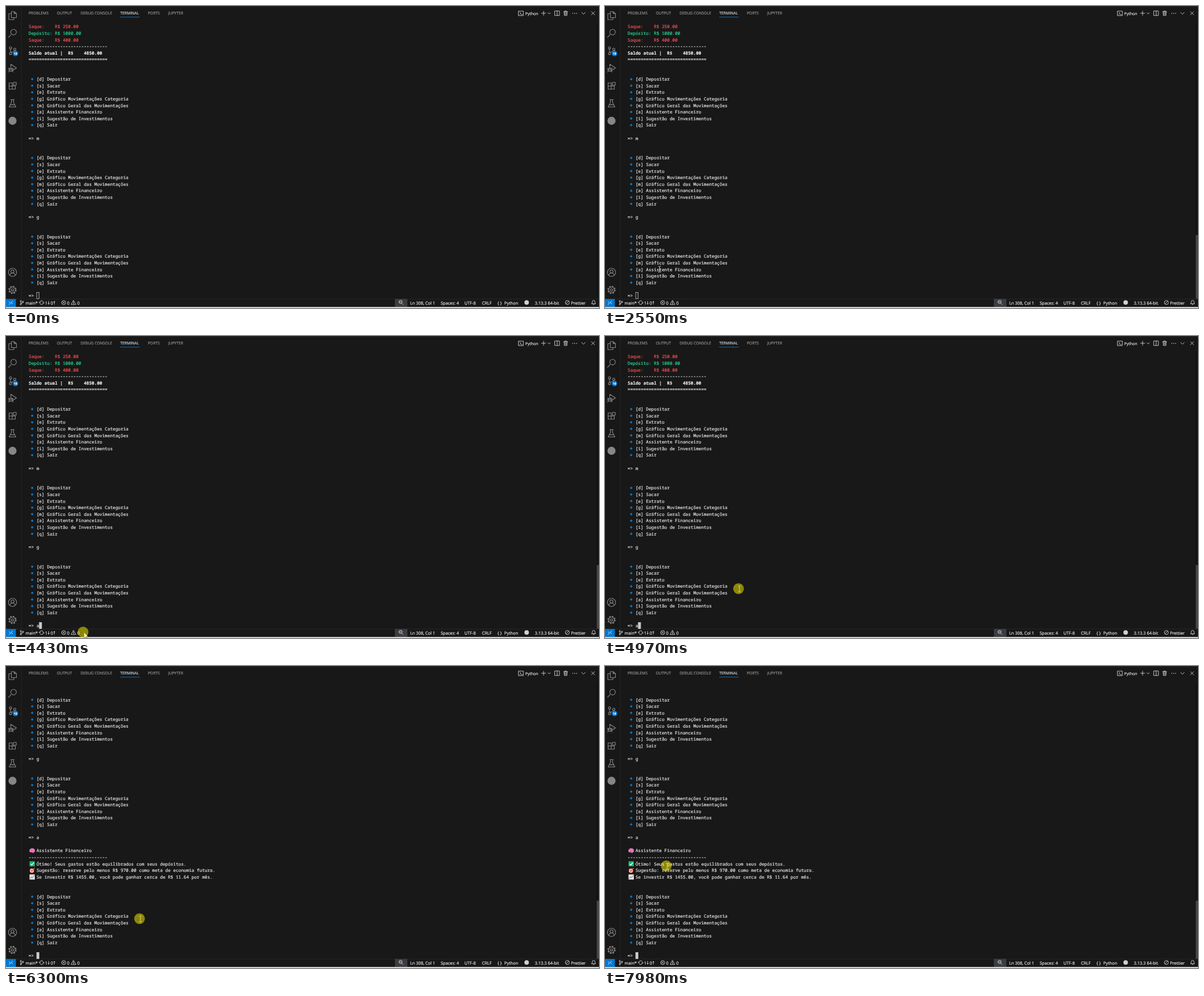
Recreate the animation shown at these times as an HTML page. Size 1049 by 534 pixels, loop 8 s.

```html
<!DOCTYPE html>
<html lang="pt-BR">
<head>
<meta charset="utf-8">
<title>Terminal</title>
<style>
html, body { margin: 0; width: 100%; height: 100%; overflow: hidden; background: #181818; }
svg { display: block; width: 1049px; height: 534px; text-rendering: geometricPrecision; }
text { white-space: pre; fill: currentColor; stroke: currentColor; stroke-width: .2; }
.mono { font: 7.75px "Noto Sans Mono", "DejaVu Sans Mono", monospace; }
.ui { font: 7.45px "Open Sans", "Noto Sans", sans-serif; color: #e4e4e4; }
.tab { font-size: 6.8px; color: #a2a2a2; stroke-width: .1; }
.icon { fill: none; stroke: #8a8a8a; stroke-width: 1.1; stroke-linejoin: round; stroke-linecap: round; }
.small { stroke: #dedede; stroke-width: .85; }
</style>
</head>
<body>
<svg id="stage" viewBox="0 0 1049 534" xmlns="http://www.w3.org/2000/svg"></svg>
<script>
const NS = 'http://www.w3.org/2000/svg';
const LOOP = 8000, COL = 4.65, PITCH = 11.605, LEFT = 40, TOP = 36.5;
const stage = document.getElementById('stage');

function add(parent, tag, attrs = {}, text) {
  const el = document.createElementNS(NS, tag);
  for (const k in attrs) el.setAttribute(k, attrs[k]);
  if (text !== undefined) el.textContent = text;
  parent.appendChild(el);
  return el;
}
const rect = (p, x, y, width, height, fill) => add(p, 'rect', { x, y, width, height, fill });
const path = (p, d, attrs) => add(p, 'path', { d, ...attrs });
const dot = (p, cx, cy, r, fill) => add(p, 'circle', { cx, cy, r, fill });
const label = (x, y, text, cls = 'ui') => add(stage, 'text', { x, y, class: cls }, text);
function icon(x, y, d, small) {
  return path(stage, d, { class: small ? 'icon small' : 'icon', transform: `translate(${x} ${y})` });
}
const ring = r => `M${-r} 0a${r} ${r} 0 1 0 ${2 * r} 0a${r} ${r} 0 1 0 ${-2 * r} 0`;
const show = (el, on) => el.setAttribute('display', on ? 'inline' : 'none');

// ---- window frame
rect(stage, 0, 0, 1049, 534, '#181818');
rect(stage, 0, .6, 1049, .8, '#2f2f2f');
rect(stage, 26.6, 1, .8, 517, '#2b2b2b');
rect(stage, 1045, 29, .8, 489, '#07090c');

// ---- activity bar
icon(11.5, 17, 'M-2 -7H3L7 -3.5V3.5H-2ZM3 -7V-3.5H7M-2 -3.5H-6.5V7H2.5V3.5');
icon(11.5, 48, 'M-2.8 2.8L-7 7.3M-3 -1.8a4.9 4.9 0 1 0 9.8 0a4.9 4.9 0 1 0 -9.8 0');
icon(11.5, 79, 'M-5.5 -5a2 2 0 1 0 4 0a2 2 0 1 0 -4 0M-5.5 5a2 2 0 1 0 4 0a2 2 0 1 0 -4 0M2 -2.5a2 2 0 1 0 4 0a2 2 0 1 0 -4 0M-3.5 -3V3M4 -.5Q4 2 -3 2.6');
icon(11.5, 110, 'M-3 -2V-7L7 -.5L.5 4M-5.5 2.5a2.6 2.9 0 1 0 5.2 0a2.6 2.9 0 1 0 -5.2 0M-7.3 0L-5 1.3M1.4 0L-1 1.3M-7.6 3H-5.5M-.3 3H1.7M-7 6.6L-5 4.6M1.2 6.6L-.9 4.6M-5.4 2H-.4');
icon(11.5, 141, 'M-6 -5H-.5V6H-6ZM-6 .5H5V6H-.5M5 .5V6M1.6 -6H6.6V-1H1.6Z');
icon(11.5, 172, 'M-3 -6.5H3M-1.8 -6.5V-1.5L-6 6.5H6L1.8 -1.5V-6.5M-4 2.6H4');
dot(stage, 11.5, 203, 7.2, '#868686');
icon(11.5, 471, ring(7.3) + 'M-2.7 -1.6a2.7 2.7 0 1 0 5.4 0a2.7 2.7 0 1 0 -5.4 0M-4.8 5.2Q-4 1.3 0 1.3Q4 1.3 4.8 5.2');
icon(11.5, 502, ring(2) + ring(5));
add(stage, 'circle', { cx: 11.5, cy: 502, r: 6.3, fill: 'none', stroke: '#868686', 'stroke-width': 2, 'stroke-dasharray': '2.5 2.448' });
dot(stage, 16.8, 84, 4.8, '#0078d4');
add(stage, 'text', { x: 16.8, y: 86, class: 'ui', 'text-anchor': 'middle', style: 'font-size:5.2px;font-weight:700;color:#fff' }, '18');

// ---- panel header
const tabs = [[40, 'PROBLEMS'], [90, 'OUTPUT'], [132, 'DEBUG CONSOLE'], [202.3, 'TERMINAL'], [251, 'PORTS'], [287, 'JUPYTER']];
for (const [x, name] of tabs) {
  const tab = label(x, 15.4, name, 'ui tab');
  if (name === 'TERMINAL') tab.style.color = '#ececec';
}
rect(stage, 202, 19.2, 34.5, .9, '#0078d4');
icon(911, 13, 'M-4.2 -4H4.2V4H-4.2ZM-2.2 -2L0 0L-2.2 2M.5 2.2H2.4', true);
label(918.5, 15.6, 'Python').style.fontSize = '7px';
icon(951, 12.8, 'M-3.7 0H3.7M0 -3.7V3.7', true);
icon(960.8, 13, 'M-2.2 -1.1L0 1.1L2.2 -1.1', true);
icon(975, 12.8, 'M-4 -4H4V4H-4ZM0 -4V4', true);
icon(990, 12.8, 'M-3.6 -2.7H3.6M-1.2 -2.7V-4H1.2V-2.7M-2.7 -2.7L-2.3 4H2.3L2.7 -2.7M-.9 -1V2.4M.9 -1V2.4', true);
for (const x of [1002.6, 1006, 1009.4]) dot(stage, x, 13, .8, '#dedede');
icon(1021.5, 13, 'M-3.2 -1.6L0 1.6L3.2 -1.6', true);
icon(1038.5, 12.8, 'M-2.8 -2.8L2.8 2.8M2.8 -2.8L-2.8 2.8', true);

// ---- status bar
rect(stage, 0, 517.6, 1049, .8, '#2b2b2b');
rect(stage, 0, 518, 17.5, 14.2, '#0078d4');
rect(stage, 688, 518, 22, 14.2, '#3a3d41');
rect(stage, 0, 532.2, 1049, 1.8, '#e4e0da');
icon(8.5, 524.8, 'M-3 -1.8L-.4 .6L-3 3M3.2 -3L.6 -.6L3.2 1.8', true).style.stroke = '#fff';
icon(28, 524.5, 'M-2.8 -2.8a1.1 1.1 0 1 0 2.2 0a1.1 1.1 0 1 0 -2.2 0M-2.8 3a1.1 1.1 0 1 0 2.2 0a1.1 1.1 0 1 0 -2.2 0M1 -1.4a1.1 1.1 0 1 0 2.2 0a1.1 1.1 0 1 0 -2.2 0M-1.7 -1.7V1.9M2.1 -.3Q2 1.3 -1.6 1.4', true);
icon(63, 524.5, 'M-3.4 .4A3.4 3.4 0 0 1 2.7 -2M3.4 -.4A3.4 3.4 0 0 1 -2.7 2M-4.6 -.8L-3.4 .5L-2.1 -.7M4.6 .8L3.4 -.5L2.1 .7', true);
icon(102, 524.5, ring(3.6) + 'M-1.5 -1.5L1.5 1.5M1.5 -1.5L-1.5 1.5', true);
icon(119.5, 524.3, 'M0 -3.6L4 3.5H-4ZM0 -1.2V1.2M0 2.2V2.4', true);
icon(698.5, 524, 'M1.5 1.5L4 4M-3.3 -.8a2.8 2.8 0 1 0 5.6 0a2.8 2.8 0 1 0 -5.6 0M-1.7 -.8H.7', true);
dot(stage, 921, 524.3, 4, '#d0d0d0');
icon(993, 524.3, ring(3.6) + 'M-2.4 2.4L2.4 -2.4', true);
icon(1039.5, 524.3, 'M-3.5 2.2H3.5L2.5 .7V-1.2A2.5 2.5 0 0 0 -2.5 -1.2V.7ZM-.8 3.6H.8', true);
// arrows of the sync counter
icon(75.5, 524.8, 'M0 -2.6V2.4M-1.4 1L0 2.4L1.4 1', true);
icon(85.5, 524.8, 'M0 2.4V-2.6M-1.4 -1.2L0 -2.6L1.4 -1.2', true);
const status = [[34.5, 'main*'], [69, '1'], [79, '0'], [108, '0'], [126, '0'], [715, 'Ln 308, Col 1'], [769, 'Spaces: 4'],
  [811, 'UTF-8'], [842, 'CRLF'], [869.5, '{ }'], [881.5, 'Python'], [935.5, '3.13.3 64-bit'], [999.5, 'Prettier']];
for (const [x, text] of status) label(x, 527.5, text);

// ---- terminal contents
const WHITE = '#e6e6e6', RED = '#f85050', GREEN = '#25d993';
const menu = ['[d] Depositar', '[s] Sacar', '[e] Extrato', '[g] Gráfico Movimentações Categoria',
  '[m] Gráfico Geral das Movimentações', '[a] Assistente Financeiro', '[i] Sugestão de Investimentos', '[q] Sair']
  .map(text => ({ text, mark: 'bullet' }));
const blank = { text: '' }, rule = { text: '-'.repeat(30) };
const ask = key => ({ text: '=> ' + key });
const block = key => [blank, blank, ...menu, blank, ask(key)];
const lines = [
  { text: 'Saque:    R$ 250.00', color: RED },
  { text: 'Depósito: R$ 1000.00', color: GREEN },
  { text: 'Saque:    R$ 400.00', color: RED },
  rule,
  { text: 'Saldo atual |  R$    4850.00', bold: true },
  { text: '='.repeat(30) },
  ...block('m'), ...block('g'), ...block(''),
  blank,
  { text: 'Assistente Financeiro', mark: 'brain' },
  rule,
  { text: 'Ótimo! Seus gastos estão equilibrados com seus depósitos.', mark: 'check' },
  { text: 'Sugestão: reserve pelo menos R$ 970.00 como meta de economia futura.', mark: 'target' },
  { text: 'Se investir R$ 1455.00, você pode ganhar cerca de R$ 11.64 por mês.', mark: 'chart' },
  ...block('')
];
const ASK_LINE = 41;

const marks = {
  bullet: g => path(g, 'M0 -2.4L2.4 0L0 2.4L-2.4 0Z', { fill: '#1274bd' }),
  brain(g) {
    path(g, 'M-4.8 1Q-5.4 -2 -2.6 -3.6Q0 -5.2 2.8 -3.8Q5.4 -2 4.8 .8Q4.6 2.4 3 2.4Q3 4.4 1 4.2L0 2.6Q-4 3.6 -4.8 1Z', { fill: '#f47cc0' });
    path(g, 'M-3 -1Q-1 -2.5 0 -.5M1 -3Q3 -2.5 2.5 0M-2 1.5Q0 .5 2 1.5', { fill: 'none', stroke: '#c2428f', 'stroke-width': .7 });
  },
  check(g) {
    add(g, 'rect', { x: -4.7, y: -4.5, width: 9.4, height: 9, rx: .8, fill: '#13b877' });
    path(g, 'M-2.8 0L-.8 2.2L3 -2.2', { fill: 'none', stroke: '#fff', 'stroke-width': 1.3 });
  },
  target(g) {
    [[4.1, '#e0443e'], [3.1, '#f4f4f4'], [2, '#e0443e'], [.8, '#fff']].forEach(([r, c]) => dot(g, -.5, .5, r, c));
    path(g, 'M-.4 .4L4.4 -4.2', { stroke: '#b98a56', 'stroke-width': 1.1 });
  },
  chart(g) {
    rect(g, -4.7, -4.5, 9.4, 9, '#e9eef2');
    path(g, 'M-4.7 -1.5H4.7M-4.7 1.5H4.7M-1.6 -4.5V4.5M1.6 -4.5V4.5', { stroke: '#b9c6cf', 'stroke-width': .5 });
    path(g, 'M-4 3L-1.5 0L.4 1.3L4 -3.2', { fill: 'none', stroke: '#d6455d', 'stroke-width': 1 });
  }
};

const screen = add(stage, 'g', { class: 'mono' });
function write(parent, col, text, color = WHITE, weight = 400) {
  return add(parent, 'text', { x: LEFT + col * COL, y: 2.8, color, 'font-weight': weight }, text);
}
const rows = lines.map((line, i) => {
  const g = add(screen, 'g', { transform: `translate(0 ${TOP + i * PITCH})` });
  if (line.mark) marks[line.mark](add(g, 'g', { transform: 'translate(46.3 0)' }));
  if (line.text) write(g, line.mark ? 3 : 0, line.text, line.color, line.bold ? 700 : 400);
  return g;
});
const typed = write(rows[ASK_LINE], 3, 'a');
const caret = add(stage, 'rect', { height: 11, stroke: '#cccccc', 'stroke-width': .8, width: COL - .5 });
const slider = rect(stage, 1045, 405, 4, 112.5, '#464646');

// ---- pointer
const pointer = add(stage, 'g');
const beam = path(pointer, 'M-2.4 -5.3Q0 -5.3 0 -4.3Q0 -5.3 2.4 -5.3M0 -4.5V4.5M-2.4 5.3Q0 5.3 0 4.3Q0 5.3 2.4 5.3',
  { fill: 'none', stroke: '#e8e8e8', 'stroke-width': .8 });
const arrow = path(pointer, 'M0 0V10.5L2.4 8.3L4 12L5.6 11.3L4 7.7H7.3Z', { fill: '#fff', stroke: '#222', 'stroke-width': .6 });
const halo = dot(stage, 0, 0, 9.5, 'rgba(255,245,0,.5)');

// start, end, number of positions, way points
const moves = [
  [190, 870, 11, [[3, 531], [8, 528], [24, 523], [50, 511], [80, 495], [101, 477]]],
  [940, 1620, 11, [[98.5, 465.5], [94, 455], [84, 441], [71, 430], [62, 428]]],
  [1820, 2550, 12, [[60, 428], [56, 432], [60, 446], [77, 458], [96.5, 465.5]]],
  [2610, 3430, 11, [[96.5, 466], [80, 480], [45, 510], [24, 524], [36, 521], [56, 513]]],
  [4020, 4280, 5, [[58, 513.5], [80, 521], [138, 524]]],
  [4570, 4970, 7, [[140, 522], [175, 492], [222, 456], [237.8, 447.3]]],
  [6630, 7390, 12, [[236, 445], [190, 408], [120, 360], [62, 336.2], [32, 341], [26.3, 355]]],
  [7460, 7980, 9, [[28, 357.5], [60, 357], [95, 354.5], [110, 353.8]]]
];

function pointerAt(t) {
  const move = moves.filter(m => m[0] <= t).pop();
  if (!move) return null;
  const [from, to, n, pts] = move;
  const step = Math.floor(Math.min(1, (t - from) / (to - from)) * (n - 1) + .1);
  const u = step / (n - 1) * (pts.length - 1);
  const i = Math.min(Math.floor(u), pts.length - 2), f = u - i;
  return [0, 1].map(k => pts[i][k] + (pts[i + 1][k] - pts[i][k]) * f);
}

// from, first line shown, last line, caret column, slider top
const views = [
  [0, 0, 41, 3, 405],
  [4430, 0, 41, 4, 405],
  [5890, 1, 41, 0, 406],
  [6300, 18, 59, 3, 415]
];
let current = null;

function setView(view) {
  const [from, first, last, col, top] = current = view;
  screen.setAttribute('transform', `translate(0 ${-first * PITCH})`);
  rows.forEach((row, i) => show(row, i >= first && i <= last));
  show(typed, from > 0);
  caret.setAttribute('x', LEFT + col * COL + .3);
  caret.setAttribute('y', 506.5);
  slider.setAttribute('y', top);
  slider.setAttribute('height', 517.5 - top);
}

function draw(t) {
  const view = views.filter(v => v[0] <= t).pop();
  if (view !== current) setView(view);
  caret.setAttribute('fill', t < 4020 ? 'none' : '#cccccc');
  slider.setAttribute('opacity', Math.max(0, Math.min(1, (t - 460) / 120)));
  const at = pointerAt(t);
  show(pointer, at);
  show(halo, at && t >= 3820);
  if (!at) return;
  const [x, y] = at, outside = x < 27 || y > 518;
  pointer.setAttribute('transform', `translate(${x} ${y})`);
  show(beam, !outside);
  show(arrow, outside);
  halo.setAttribute('cx', x - 1.6);
  halo.setAttribute('cy', y - .5);
}

const start = performance.now();
function tick() {
  draw((performance.now() - start) % LOOP);
  requestAnimationFrame(tick);
}
tick();
</script>
</body>
</html>
```
